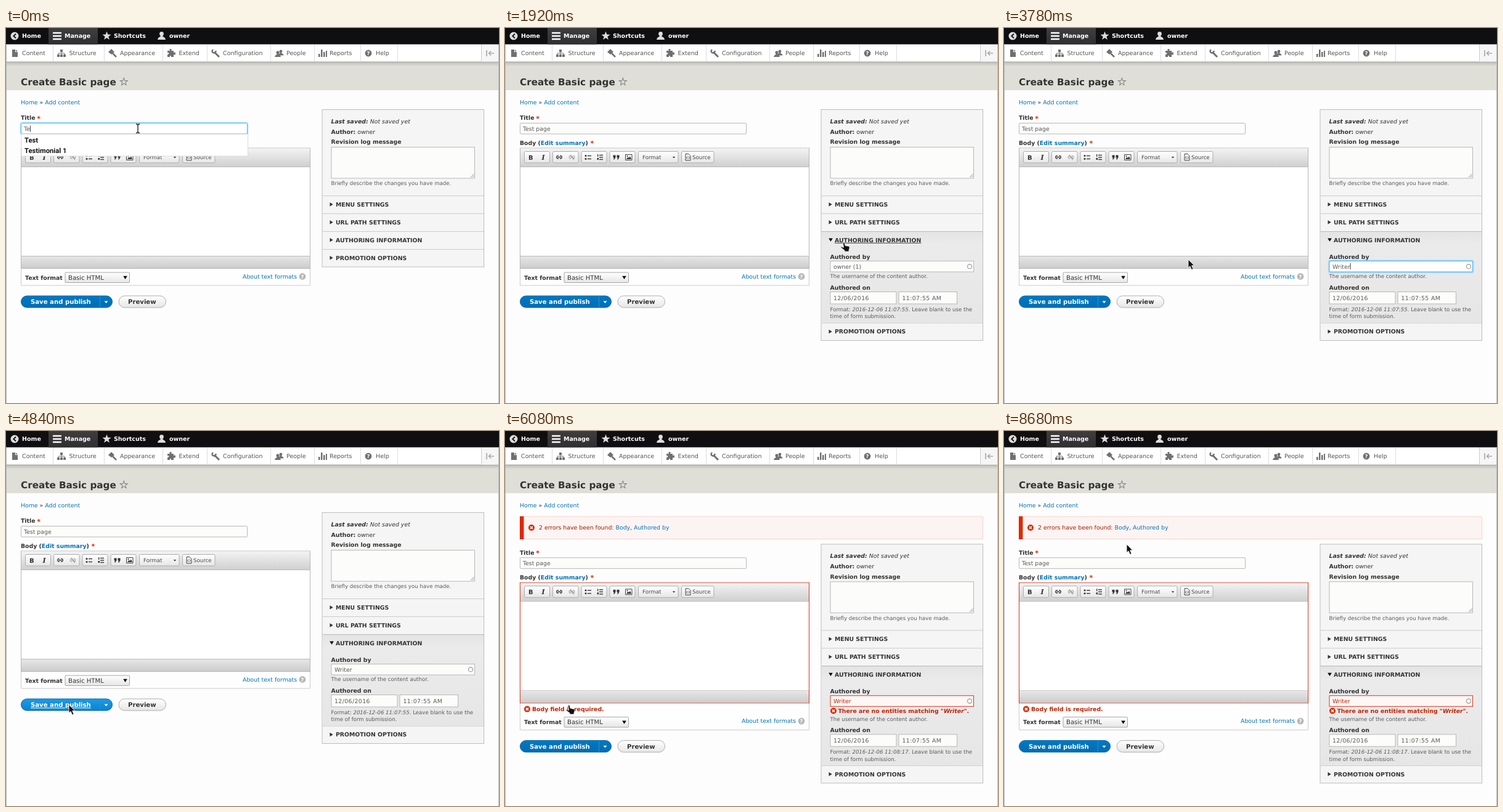
Write an HTML page that moves like this. It is 800x609 px and loops after 8740 ms.

```html
<!DOCTYPE html>
<html lang="en">
<head>
<meta charset="utf-8">
<title>Form errors</title>
<style>
html, body { margin: 0; width: 100%; height: 100%; overflow: hidden; background: #fdfdfd; }
svg { display: block; width: 800px; height: 609px; }
text {
  font: 9.35px "DejaVu Sans", Verdana, sans-serif;
  fill: #333; white-space: pre; text-rendering: geometricPrecision;
}
.b { font-weight: bold; }
.i { font-style: italic; }
.link { fill: #0074bd; }
.star { font-size: 11px; font-weight: bold; fill: #e32700; }
.small { font-size: 8.6px; fill: #595959; }
.tool { font-size: 8.65px; fill: #484848; }
.bar { font-size: 9.5px; font-weight: bold; fill: #fff; }
.tray { font-size: 9.5px; fill: #565656; }
.btn { font-size: 10.15px; font-weight: bold; }
.value { fill: #595959; }
.date { fill: #595959; letter-spacing: .4px; }
.option { font: bold 11.2px Roboto, sans-serif; fill: #111; }
.field { fill: #fcfcfa; stroke: #b8b8b8; }
.focus { fill: #fff; stroke: #40b6ff; filter: drop-shadow(0 0 1.5px #40b6ff); }
.bad { fill: #fdf8f6; stroke: #e0321a; }
.err { fill: #c52200; }
.warn { fill: #a51b00; }
.group { fill: url(#key); stroke: #adadad; }
.rule { stroke: #ccc; }
.ico { fill: #707070; }
.line { fill: none; stroke: #707070; stroke-width: 1.4; }
</style>
</head>
<body>
<svg viewBox="0 0 800 609" xmlns="http://www.w3.org/2000/svg">
<defs>
  <linearGradient id="key" x2="0" y2="1"><stop stop-color="#fff"/><stop offset="1" stop-color="#e6e6e6"/></linearGradient>
  <linearGradient id="strip" x2="0" y2="1"><stop stop-color="#f3f3f3"/><stop offset="1" stop-color="#cfd0cf"/></linearGradient>
  <linearGradient id="foot" x2="0" y2="1"><stop stop-color="#e6e6e6"/><stop offset="1" stop-color="#cbcccb"/></linearGradient>
  <linearGradient id="tab" x2="0" y2="1"><stop stop-color="#3e3e40"/><stop offset="1" stop-color="#2f2f32"/></linearGradient>
  <linearGradient id="shade" x2="0" y2="1"><stop stop-color="#bcbcb6"/><stop offset="1" stop-color="#dfdfd8"/></linearGradient>
  <linearGradient id="open" x2="0" y2="1"><stop stop-color="#e4e4e4"/><stop offset=".15" stop-color="#ebebec"/><stop offset="1" stop-color="#e6e6e7"/></linearGradient>
  <linearGradient id="blue" x2="0" y2="1"><stop stop-color="#0079c4"/><stop offset="1" stop-color="#006db4"/></linearGradient>
  <linearGradient id="bright" x2="0" y2="1"><stop stop-color="#1d9ae6"/><stop offset="1" stop-color="#0b83d0"/></linearGradient>
  <path id="star5" d="M0-1 .24-.32 .95-.31 .38.12 .59.81 0 .4-.59.81-.38.12-.95-.31-.24-.32Z"/>
  <g id="cross"><circle r="5" fill="#e02800"/><path d="M-2-2 2 2M2-2-2 2" stroke="#fff" stroke-width="1.7"/></g>
  <path id="shut" d="M0-3.2 5.2 0 0 3.2Z" fill="#333"/>
  <path id="drop" d="M-3.3-2.5H3.3L0 2.8Z"/>
  <g id="person"><circle cy="-3" r="3.4"/><path d="M-6.5 6.5Q-6 2.4-2 1.5V0H2V1.5Q6 2.4 6.5 6.5Z"/></g>
  <g id="help"><circle r="5.4"/><text class="b" x="0" y="3" text-anchor="middle" style="fill:#fff;font-size:8.4px">?</text></g>
</defs>

<rect width="800" height="609" fill="#fdfdfd"/>
<!-- Header -->
<rect y="55" width="800" height="46" fill="#dfdfd8"/>
<rect y="55" width="800" height="7" fill="url(#shade)"/>
<rect y="27" width="800" height="28" fill="#fff"/>
<rect y="54.5" width="800" height="1" fill="#a5a5a2"/>
<rect width="800" height="26.5" fill="#0f0f12"/>
<rect x="69" width="80" height="26.5" fill="url(#tab)"/>
<circle cx="14" cy="13" r="6.5" fill="#ddd"/>
<path d="M16 9.5 12.3 13 16 16.5" fill="none" stroke="#111" stroke-width="1.8"/>
<path d="M76 8H90M76 13H90M76 18H90" stroke="#fff" stroke-width="2.4"/>
<use href="#star5" fill="#ddd" transform="translate(163.500 13) scale(7.500)"/>
<use href="#person" x="252.500" y="12.500" fill="#ddd"/>
<text class="bar" x="26" y="16.300">Home</text>
<text class="bar" x="95" y="16.300">Manage</text>
<text class="bar" x="175" y="16.300">Shortcuts</text>
<text class="bar" x="265" y="16.300">owner</text>

<path d="M76.500 27V54M159.500 27V54M254.500 27V54M326.500 27V54M429.500 27V54M500.500 27V54M575.500 27V54M635.500 27V54" stroke="#ddd"/>
<rect x="771" y="27" width="29" height="27.500" fill="#f6f6f6"/>
<path d="M771.500 27V54" stroke="#ccc"/>
<path class="ico" d="M10 35H15V39H19V47H10ZM16 35 19 38H16Z"/>
<path class="ico" d="M88 35H92V39H88ZM83 43H87V47H83ZM88 43H92V47H88ZM93 43H97V47H93Z"/>
<path class="line" d="M90 39V43M85 43V41H95V43" style="stroke-width:1"/>
<path class="ico" d="M166 39 171 34 176 39 171 43Z"/>
<path class="line" d="M173 41 179 47" style="stroke-width:2.500"/>
<path class="ico" d="M262 37H266Q264 34 267 34T268 37H272V40Q275 38 275 41.500T272 43V47H268Q268 44 266 45V47H262V43Q265 43 264 40H262Z"/>
<path class="line" d="M338 39 346 47" style="stroke-width:3"/>
<path class="line" d="M336 35Q333 38 336 40T341 37" style="stroke-width:2.400"/>
<g class="ico"><use href="#person" transform="translate(446 40) scale(.7)"/><use href="#person" transform="translate(441 42) scale(.75)"/></g>
<path class="ico" d="M507 42H509.500V47H507ZM511 35H513.500V47H511ZM515 39H517.500V47H515ZM519 37H521V47H519Z"/>
<use href="#help" x="588" y="41" class="ico"/>
<path d="M780 36V46M783 41H792M787 37.500 783.500 41 787 44.500" fill="none" stroke="#aaa" stroke-width="1.700"/>
<text class="tray" x="26" y="44.300">Content</text>
<text class="tray" x="102.500" y="44.300">Structure</text>
<text class="tray" x="185" y="44.300">Appearance</text>
<text class="tray" x="280.500" y="44.300">Extend</text>
<text class="tray" x="352" y="44.300">Configuration</text>
<text class="tray" x="455" y="44.300">People</text>
<text class="tray" x="525" y="44.300">Reports</text>
<text class="tray" x="600" y="44.300">Help</text>
<path d="M.5 27V609M799.500 27V609" stroke="#b8b8b8"/>

<text class="b" x="24" y="92.500" style="font-size:15.200px">Create Basic page</text>
<use href="#star5" fill="none" stroke="#808080" stroke-width=".16" transform="translate(191.300 87.500) scale(6.300)"/>
<text x="24" y="123.500"><tspan class="link">Home</tspan> » <tspan class="link">Add content</tspan></text>

<g id="notice">
  <rect x="24.500" y="139" width="751" height="36.500" rx="1.500" fill="#fcf4f2" stroke="#f6d2ca"/>
  <rect x="24" y="138.500" width="6.500" height="37.500" fill="#e02800"/>
  <use href="#cross" x="43" y="157"/>
  <text class="warn" x="55" y="160.300">2 errors have been found: <tspan class="link">Body</tspan>, <tspan class="link">Authored by</tspan></text>
</g>

<!-- Text format and buttons -->
<g id="low">
  <path d="M24.500 374V418H493.500V374" fill="#fefefe" stroke="#ccc"/>
  <g id="bodyErr"><use href="#cross" x="36" y="384"/><text class="b err" x="44" y="387.300">Body field is required.</text></g>
  <text class="b" x="31" y="408.500">Text format</text>
  <rect x="96" y="397" width="104.500" height="16.500" rx="1" fill="url(#key)" stroke="#a6a6a6"/>
  <text x="101" y="408.800" style="font-size:10.050px">Basic HTML</text>
  <use href="#drop" x="193.500" y="405.300"/>
  <text class="link" x="384" y="406.500">About text formats</text>
  <use href="#help" x="481" y="403.500" fill="#b8b8b8"/>
  <rect id="save" x="24.500" y="435" width="148" height="19" rx="9.500" stroke="#0a68a8"/>
  <path d="M152.500 435.500V453.500" stroke="#2f8fcd"/>
  <text id="saveText" class="btn" x="40" y="448.300" style="fill:#fff">Save and publish</text>
  <path d="M159.500 443.500H165.500L162.500 447Z" fill="#fff"/>
  <rect x="183" y="435" width="76.500" height="19" rx="9.500" fill="url(#key)" stroke="#adadad"/>
  <text class="btn" x="198" y="448.300">Preview</text>
</g>

<g id="main">
  <text class="b" x="24" y="149.300">Title</text><text class="star" x="50.200" y="150.500">*</text>
  <text class="b" x="24" y="190">Body (<tspan class="link">Edit summary</tspan>)</text><text class="star" x="138.500" y="191">*</text>
  <rect id="title" x="24.500" y="154.500" width="367" height="17.500" rx="1"/>
  <text id="titleText" class="value" x="29" y="167"></text>

  <g id="editor">
    <rect id="frame" x="24.500" y="195" width="469" height="195.500" fill="#fff"/>
    <rect x="25" y="195.500" width="468" height="29.500" fill="url(#strip)"/>
    <path d="M25 225.500H493M25 370.500H493" stroke="#b9b9b9"/>
    <rect x="25" y="371" width="468" height="19" fill="url(#foot)"/>
    <g class="group">
      <rect x="31.500" y="200.500" width="41" height="18.500" rx="2"/><rect x="77.500" y="200.500" width="41.500" height="18.500" rx="2"/>
      <rect x="124" y="200.500" width="41" height="18.500" rx="2"/><rect x="170" y="200.500" width="41" height="18.500" rx="2"/>
      <rect x="216.500" y="200.500" width="64.500" height="18.500" rx="2"/><rect x="286.500" y="200.500" width="52.500" height="18.500" rx="2"/>
    </g>
    <text class="b" x="38" y="213.500" style="font-size:10px">B</text>
    <text class="b i" x="59.500" y="213.500" style="font:italic bold 11px 'DejaVu Serif','Liberation Serif',serif">I</text>
    <g fill="none" stroke="#444" stroke-width="1.500">
      <path id="chain" d="M87 207.500H85.500A2.300 2.300 0 0 0 85.500 212H87M89 207.500H90.500A2.300 2.300 0 0 1 90.500 212H89M85.500 209.800H90.500"/>
      <use href="#chain" x="20.500" opacity=".35"/>
      <path d="M106 206 112 214" opacity=".35"/>
      <path d="M134 207.500H140M134 212.500H140M153 206.500H159M153 210H159M153 213.500H159"/>
    </g>
    <g fill="#333"><circle cx="131" cy="207.500" r="1.500"/><circle cx="131" cy="212.500" r="1.500"/>
      <path d="M150 205H151.300V209H150ZM149.500 211H152V214H149.500Z"/>
      <path d="M175.500 206.500H179.500V210L177.500 213.500H176L177 210.500H175.500ZM181.500 206.500H185.500V210L183.500 213.500H182L183 210.500H181.500Z"/>
      <path d="M197 213 199.500 209.500 201 211 203 208.500 205 213Z"/><circle cx="198.500" cy="208" r="1"/>
      <path d="M271.800 209H276.200L274 211.500Z"/></g>
    <path d="M195.500 205.500H206V214.500H195.500ZM293 204.500H298L301 207.500V215H293ZM296 208.500 294.700 210.500 296 212.500M298 208.500 299.300 210.500 298 212.500" fill="none" stroke="#444"/>
    <text class="tool" x="223" y="213.200">Format</text>
    <text class="tool" x="304" y="213.200">Source</text>
  </g>

  <!-- Side panel -->
  <rect id="panel" x="513" y="132.500" width="262.500" fill="#f5f5f6" stroke="#bdbdbd"/>
  <text x="527.500" y="154.500"><tspan class="b i">Last saved:</tspan><tspan class="i"> Not saved yet</tspan></text>
  <text x="527.500" y="171.800"><tspan class="b">Author:</tspan> owner</text>
  <text class="b" x="527.500" y="188.300">Revision log message</text>
  <rect class="field" x="528" y="193.500" width="232.500" height="50.500"/>
  <path d="M754 242.500 759.500 237M757 242.500 759.500 240" stroke="#888"/>
  <text class="small" x="527.500" y="255.300">Briefly describe the changes you have made.</text>
  <path class="rule" d="M513.500 272.500H775M513.500 301.500H775M513.500 330.500H775"/>
  <use href="#shut" x="525.500" y="286.500"/><text class="b" x="535" y="290">MENU SETTINGS</text>
  <use href="#shut" x="525.500" y="315.500"/><text class="b" x="535" y="319">URL PATH SETTINGS</text>
  <g id="details">
    <rect id="shadeBox" x="513.500" y="330.500" width="261.500" fill="url(#open)"/>
    <path d="M513.500 330.500H775" stroke="#bbb"/>
    <use href="#drop" x="528.500" y="344"/>
    <text class="b" x="527.500" y="374.500">Authored by</text>
    <rect id="author" x="528" y="378.500" width="232.500" height="17.500"/>
    <text id="authorText" x="533" y="390.500"></text>
    <circle cx="754" cy="387.300" r="3.600" fill="none" stroke="#aaa" stroke-width="1.400"/>
    <g id="nameErr"><use href="#cross" x="533" y="403.200"/>
      <text class="b err" x="540.500" y="406.300">There are no entities matching "<tspan class="i">Writer</tspan>".</text></g>
    <g id="after">
      <text class="small" x="527.500" y="406.300">The username of the content author.</text>
      <text class="b" x="527.500" y="425">Authored on</text>
      <rect class="field" x="528" y="428.500" width="107" height="19.500"/><rect class="field" x="639" y="428.500" width="94.500" height="19.500"/>
      <text class="date" x="533" y="442">12/06/2016</text><text class="date" x="644.500" y="442">11:07:55 AM</text>
      <text class="small" x="527.500" y="459.800">Format: <tspan id="stamp" class="i"></tspan>. Leave blank to use the</text>
      <text class="small" x="527.500" y="471.300">time of form submission.</text>
    </g>
  </g>
  <use id="closed" href="#shut" x="525.500" y="344.300"/>
  <text id="heading" class="b" x="535" y="347.800">AUTHORING INFORMATION</text>
  <g id="promo"><path class="rule" d="M513.500 359.500H775"/><use href="#shut" x="525.500" y="373.300"/><text class="b" x="535" y="376.800">PROMOTION OPTIONS</text></g>

  <g id="menu">
    <rect x="25" y="172.500" width="367.500" height="35.500" fill="#fff" stroke="#ddd"/>
    <text class="option" x="30" y="185.800">Test</text><text class="option" x="30" y="203">Testimonial 1</text>
  </g>
  <path id="caret" stroke="#222" stroke-width=".9"/>
</g>

<g id="pointer">
  <path id="beam" d="M-3-7Q0-7 0-5Q0-7 3-7M0-5V6M-3 7.500Q0 7.500 0 5.500Q0 7.500 3 7.500" fill="none" stroke="#222" stroke-width="1.400"/>
  <path id="arrow" d="M0 0V13.500L3 10.800 5.500 16.500 8 15.400 5.600 9.800H9.800Z" fill="#111" stroke="#fff" stroke-width=".8"/>
  <path id="hand" d="M.5 1Q1.800-1 3 1L4 5.500 10 6.500Q11.500 7 11 9.500L10 13V15H3V13L-3 8.500Q-2.500 6.500 0 8L1.500 8.500Z" fill="#111" stroke="#fff" stroke-width=".7"/>
</g>
</svg>

<script>
const LOOP = 8740, OPEN = 1920, RELOAD = 5090, EDITOR_READY = 5700;
const el = {};
document.querySelectorAll('[id]').forEach(e => el[e.id] = e);

// Pointer stops: time, x, y
const route = [
  [0, 214, 163], [1000, 214, 163], [1750, 548, 348], [2060, 548, 348],
  [2500, 600, 387], [3350, 600, 387], [3780, 299, 376], [4600, 102, 444],
  [5090, 102, 445], [6300, 102, 445], [7300, 185, 300], [8200, 199, 184], [LOOP, 199, 184]
];
const shapes = [
  [1050, 'beam'], [1700, 'arrow'], [2150, 'hand'], [2400, 'arrow'],
  [3400, 'beam'], [RELOAD, 'arrow'], [6330, 'hand'], [LOOP + 1, 'arrow']
];

const show = (node, on) => node.setAttribute('display', on ? 'inline' : 'none');
const shift = (node, y, x = 0) => node.setAttribute('transform', `translate(${x} ${y})`);
const style = (node, name) => node.setAttribute('class', name);
const typed = (word, n) => word.slice(0, Math.max(0, Math.floor(n)));

function pointerAt(t) {
  const i = route.findIndex(p => p[0] > t);
  const [t0, x0, y0] = route[i - 1], [t1, x1, y1] = route[i];
  const k = (t - t0) / (t1 - t0), e = k * k * (3 - 2 * k);
  return [x0 + (x1 - x0) * e, y0 + (y1 - y0) * e];
}

function drawCaret(node) {
  const x = +node.getAttribute('x') + node.getComputedTextLength() + .6;
  const y = +node.getAttribute('y');
  el.caret.setAttribute('d', `M${x} ${y - 8.5}V${y + 1.5}`);
}

function draw(t) {
  const failed = t >= RELOAD, open = t >= OPEN;
  const titleFocus = t < OPEN, authorFocus = t >= 2560 && t < 4780;
  const ready = !failed || t >= EDITOR_READY;
  const extra = failed ? 13 : 0;

  show(el.notice, failed);
  show(el.bodyErr, failed);
  show(el.nameErr, failed);
  show(el.editor, ready);
  shift(el.main, failed ? 51.3 : 0);
  shift(el.low, !failed ? 0 : ready ? 67.6 : -23.9);
  el.frame.setAttribute('stroke', failed ? '#e0321a' : '#b6b6b6');

  const title = typed('Test page', 2 + t / 120);
  el.titleText.textContent = title;
  style(el.title, titleFocus ? 'focus' : 'field');
  show(el.menu, title.length < 5);

  show(el.details, open);
  show(el.closed, !open);
  shift(el.after, extra);
  shift(el.promo, open ? 119.7 + extra : 0);
  el.panel.setAttribute('height', open ? 375 + extra : 255.5);
  el.shadeBox.setAttribute('height', 148 + extra);
  el.stamp.textContent = failed ? '2016-12-06 11:08:17' : '2016-12-06 11:07:55';
  el.authorText.textContent = t < 2850 ? 'owner (1)' : typed('Writer', (t - 2850) / 90);
  style(el.authorText, failed ? 'err' : 'value');
  style(el.author, failed ? 'bad' : authorFocus ? 'focus' : 'field');

  show(el.caret, titleFocus || authorFocus);
  if (titleFocus) drawCaret(el.titleText);
  else if (authorFocus) drawCaret(el.authorText);

  const [x, y] = pointerAt(t);
  const shape = shapes.find(s => t < s[0])[1];
  const onSave = !failed && x < 165 && y > 435;
  const onHeading = shape === 'hand' && !failed;
  shift(el.pointer, y, x);
  ['beam', 'arrow', 'hand'].forEach(name => show(el[name], name === shape));
  el.save.setAttribute('fill', onSave ? 'url(#bright)' : 'url(#blue)');
  el.saveText.setAttribute('text-decoration', onSave ? 'underline' : 'none');
  el.heading.setAttribute('text-decoration', onHeading ? 'underline' : 'none');
}

const start = performance.now();
function tick() {
  draw((performance.now() - start) % LOOP);
  requestAnimationFrame(tick);
}
tick();
</script>
</body>
</html>
```
